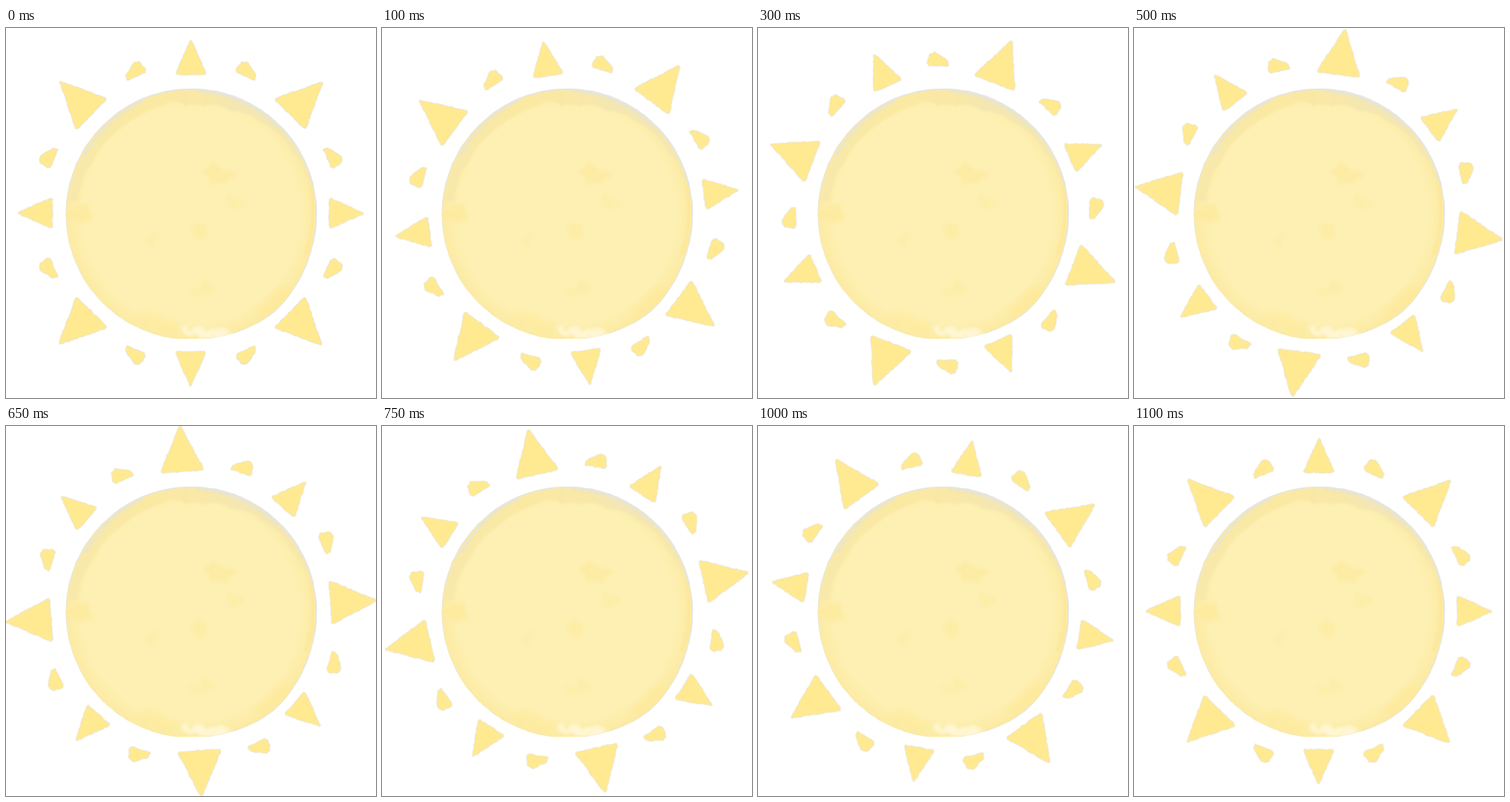
An HTML page that plays this animation: 500 px wide and 500 px high, repeating every 1150 ms.

```html
<!DOCTYPE html>
<html lang="en">
<head>
<meta charset="utf-8">
<title>Sun</title>
<style>
  html, body { margin: 0; width: 100%; height: 100%; overflow: hidden; background: #fff; }
  svg { display: block; width: 100vw; height: 100vh; }
  #rays {
    fill: #ffe991;
    stroke: #e6e6e6;
    stroke-width: 1.6;
    stroke-linejoin: round;
    paint-order: stroke;
    transform-origin: 249.7px 250.2px;
    animation: turn 1150ms infinite;
  }
  /* a quarter turn in 50 ms steps, then one held step */
  @keyframes turn {
    0%       { transform: rotate(0deg);     animation-timing-function: steps(6); }
    26.087%  { transform: rotate(-23.4deg); animation-timing-function: steps(4); }
    43.478%  { transform: rotate(-37deg);   animation-timing-function: steps(3); }
    56.522%  { transform: rotate(-48.5deg); animation-timing-function: steps(4); }
    73.913%  { transform: rotate(-65.8deg); animation-timing-function: steps(5); }
    95.652%, 100% { transform: rotate(-90deg); }
  }
</style>
</head>
<body>
<svg viewBox="0 0 500 500">
  <defs>
    <radialGradient id="wash" gradientUnits="userSpaceOnUse" cx="250" cy="252" r="171">
      <stop offset="0" stop-color="#fdf0b2"/>
      <stop offset=".86" stop-color="#fdf0b2"/>
      <stop offset="1" stop-color="#fceaa1"/>
    </radialGradient>
    <linearGradient id="bandTone" gradientUnits="userSpaceOnUse" x1="90" y1="0" x2="410" y2="0">
      <stop offset="0" stop-color="#f8e9ab"/>
      <stop offset=".3" stop-color="#fbe9a2"/>
      <stop offset=".55" stop-color="#f9e8a7"/>
      <stop offset=".72" stop-color="#f4e7b3"/>
      <stop offset="1" stop-color="#f6e8ae"/>
    </linearGradient>
    <filter id="soft" x="-10%" y="-10%" width="120%" height="120%" color-interpolation-filters="sRGB">
      <feTurbulence type="fractalNoise" baseFrequency=".06" numOctaves="3" seed="9"/>
      <feDisplacementMap in="SourceGraphic" scale="26" xChannelSelector="R" yChannelSelector="G"/>
      <feGaussianBlur stdDeviation="2.2"/>
    </filter>
    <filter id="blur" color-interpolation-filters="sRGB"><feGaussianBlur stdDeviation="1.2"/></filter>
    <clipPath id="disc"><path id="discEdge"/></clipPath>
    <clipPath id="floor"><rect width="500" height="420"/></clipPath>
  </defs>

  <g clip-path="url(#floor)">
    <path id="rim" fill="#e4e5e5"/>
    <path id="body" fill="url(#wash)"/>
    <g clip-path="url(#disc)">
      <path filter="url(#blur)" fill="url(#bandTone)" d="M70 235 V70 H430 V220 H412
        Q406 190 386 167 Q371 140 342 126 Q326 111 303 112 Q285 99 268 106 Q253 101 243 106
        Q227 93 210 105 Q180 114 158 134 Q128 154 118 181 Q101 197 98 235 Z"/>
      <path filter="url(#blur)" fill="none" stroke="#e6e4d6" stroke-width="2.5"
        d="M258 85 Q322 89 368 134 M106 172 Q140 116 186 98"/>
      <path filter="url(#blur)" fill="none" stroke="#fce79b" stroke-width="5"
        d="M412 212 Q421 260 405 305"/>
      <g filter="url(#soft)" fill="#fee895">
        <ellipse cx="287" cy="197" rx="20" ry="9" transform="rotate(22 287 197)" opacity=".5"/>
        <ellipse cx="311" cy="236" rx="13" ry="6" opacity=".35"/>
        <ellipse cx="262" cy="275" rx="11" ry="10" opacity=".45"/>
        <ellipse cx="195" cy="284" rx="9" ry="6" opacity=".3"/>
        <ellipse cx="101" cy="251" rx="13" ry="11" opacity=".6"/>
        <ellipse cx="267" cy="353" rx="17" ry="7" opacity=".3"/>
        <ellipse cx="362" cy="370" rx="28" ry="9" transform="rotate(-45 362 370)" opacity=".4"/>
        <ellipse cx="205" cy="398" rx="36" ry="9" transform="rotate(14 205 398)" opacity=".4"/>
        <ellipse cx="272" cy="412" rx="32" ry="7" fill="#fff6d4"/>
      </g>
    </g>
  </g>

  <g id="rays"></g>
</svg>
<script>
  const byId = id => document.getElementById(id);
  let seed = 7;
  const rand = () => (seed = seed * 16807 % 2147483647) / 2147483647;
  const pathOf = pts => 'M' + pts.map(p => p.map(v => v.toFixed(1)).join(' ')).join('L') + 'Z';

  // Nearly round outline with a slight swell at the lower right
  function blob(cx, cy, radius, jitter) {
    const pts = [];
    for (let deg = 0; deg < 360; deg += 1.5) {
      const a = deg * Math.PI / 180;
      const r = radius + 3.5 * Math.exp(-(((deg - 50) / 19) ** 2)) + (rand() - .5) * jitter;
      pts.push([cx + r * Math.cos(a), cy + r * Math.sin(a)]);
    }
    return pathOf(pts);
  }

  // Torn-paper outline: jittered points along each side, corners clipped
  function torn(corners, clip) {
    const pts = [];
    corners.forEach(([ax, ay], i) => {
      const [bx, by] = corners[(i + 1) % corners.length];
      const dx = bx - ax, dy = by - ay, len = Math.hypot(dx, dy);
      const count = Math.round(len / 3.2), inset = clip / len;
      for (let k = 0; k <= count; k++) {
        const t = inset + (1 - 2 * inset) * k / count;
        const j = (rand() - .5) * 1.4;
        pts.push([ax + dx * t - dy / len * j, ay + dy * t + dx / len * j]);
      }
    });
    return pathOf(pts);
  }

  const edge = blob(250, 252.4, 168.6, 1);
  byId('rim').setAttribute('d', blob(250.5, 251.4, 169.8, .6));
  byId('body').setAttribute('d', edge);
  byId('discEdge').setAttribute('d', edge);

  const medium = [[250, 15], [271, 63], [229, 63]];
  const big = [[428.5, 72.5], [404.5, 137.5], [362, 95.5]];
  const small = [[319, 46], [326.5, 46.5], [337.5, 64], [336, 71], [312, 60.5], [311, 56]];
  const smallTwin = small.map(([x, y]) => [500 - y, 500 - x]);

  for (let turn = 0; turn < 360; turn += 90) {
    for (const shape of [medium, big, small, smallTwin]) {
      const ray = document.createElementNS('http://www.w3.org/2000/svg', 'path');
      ray.setAttribute('d', torn(shape, shape.length > 3 ? .8 : 2.4));
      ray.setAttribute('transform', `rotate(${turn} 249.7 250.2)`);
      byId('rays').append(ray);
    }
  }
</script>
</body>
</html>
```
